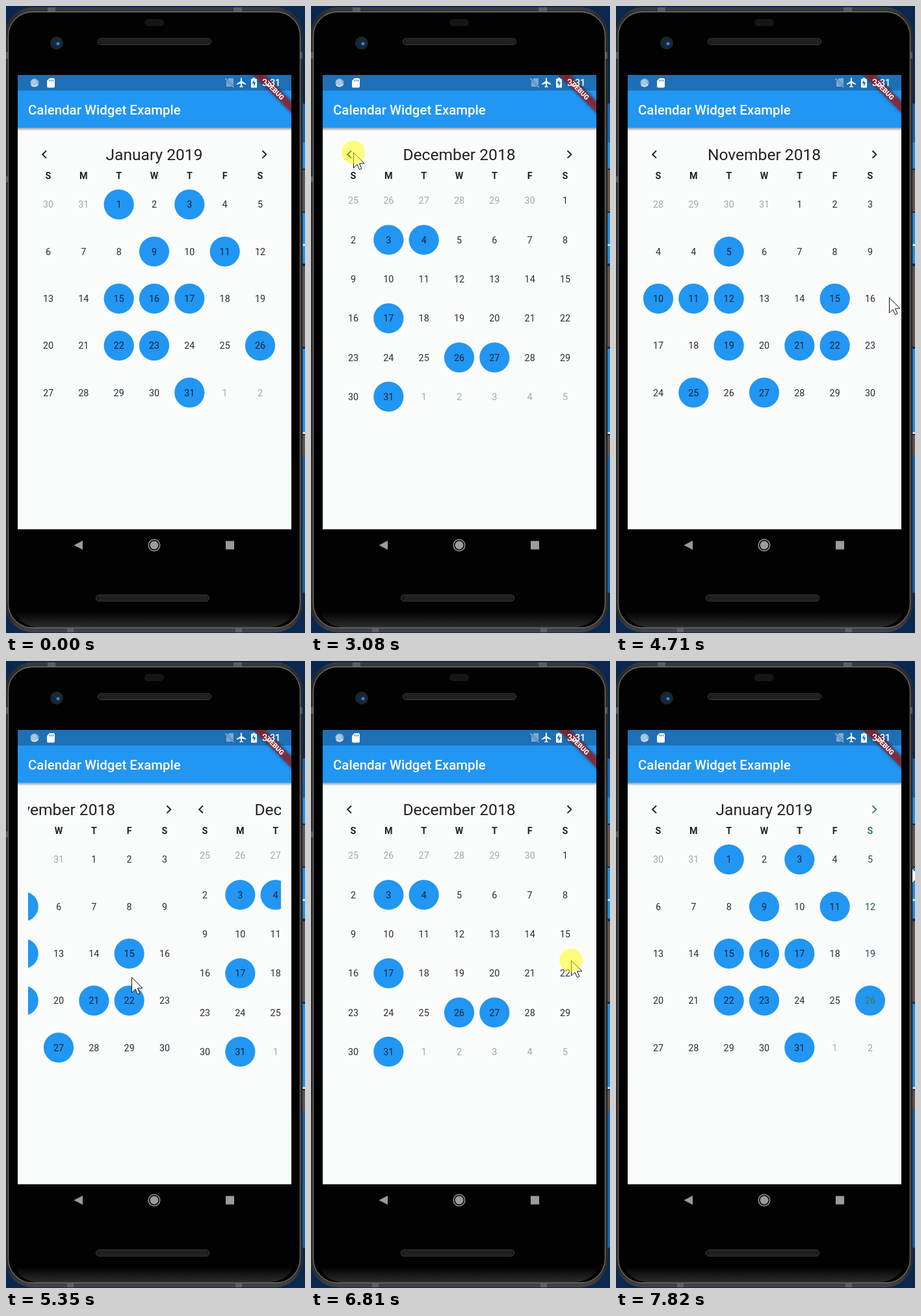
Write an HTML page that moves like this. It is 460 px wide and 964 px high and loops after 8 s.

```html
<!DOCTYPE html>
<html lang="en">
<head>
<meta charset="utf-8">
<title>Calendar swipe</title>
<style>
  html, body { margin: 0; width: 100%; height: 100%; overflow: hidden; background: #0a2750; }
  svg { display: block; width: 100vw; height: 100vh; }
  text { font-family: Roboto, sans-serif; }
  .page text { text-anchor: middle; font-size: 14.34px; fill: #2c2c2c; }
  .page .title { font-size: 24.58px; fill: #222; }
  .page .weekday { font-weight: 700; fill: #222; }
  .page .outside { fill: #a5a7a6; }
  .page .marked { fill: #0a2236; }
  .page circle { fill: #2196f3; }
  .page path { fill: none; stroke: #222; stroke-width: 2; }
  .tinted .col6 { fill: #1f4f5c; }
  .tinted .col6.weekday { fill: #2f8248; }
  .tinted .col6.outside { fill: #8fa9b8; }
  .tinted .col6.marked { fill: #4d7a3a; }
  .tinted .next { stroke: #2f8a4c; }
</style>
</head>
<body>
<svg viewBox="0 0 460 964" preserveAspectRatio="none">
  <defs>
    <linearGradient id="rim" x2="0" y2="1">
      <stop offset="0" stop-color="#3c3e3e"/><stop offset=".012" stop-color="#2b2c2c"/>
      <stop offset=".975" stop-color="#2b2c2c"/><stop offset="1" stop-color="#444"/>
    </linearGradient>
    <linearGradient id="chin" x2="0" y2="1">
      <stop offset="0" stop-color="#2c2c2c" stop-opacity="0"/><stop offset="1" stop-color="#2c2c2c"/>
    </linearGradient>
    <linearGradient id="shade" x2="0" y2="1">
      <stop offset="0" stop-opacity=".4"/><stop offset="1" stop-opacity="0"/>
    </linearGradient>
    <filter id="soft" x="-20%" y="-20%" width="140%" height="140%"><feGaussianBlur stdDeviation="2.500"/></filter>
    <clipPath id="screen"><path d="M18 106h421v698.500H18z"/></clipPath>
    <clipPath id="viewport"><path d="M34 200h389v440H34z"/></clipPath>
  </defs>

  <!-- desktop behind the phone, with the side buttons -->
  <path fill="#0a2750" d="M0 0h460v964H0z"/>
  <path fill="#1565b5" d="M452 150h8v60h-8zM452 690h8v212h-8z"/>
  <path fill="#1c93ea" d="M452 210h8v40h-8zM452 318h8v78h-8zM452 527h8v130h-8z"/>
  <path fill="#665850" d="M452 252h8v64h-8zM452 400h8v124h-8zM452 660h8v30h-8z"/>
  <path fill="#d7e6f3" d="M452 366h8v3h-8zM452 655h8v3h-8z"/>

  <!-- phone body -->
  <rect x="-1" y="2" width="457.500" height="961" rx="42" fill="url(#rim)"/>
  <rect x="3.500" y="9" width="449" height="947" rx="37" fill="#020202" stroke="#707272" stroke-width="1.300"/>
  <path fill="url(#chin)" d="M14 932h428q-9 20-34 23H46q-24-3-32-23z"/>
  <path fill="#777" d="M0 71h4v10H0zM0 262h4v9H0zM453 71h3v10h-3zM64 2h12v7H64zM350 2h13v7h-13zM94 957h10v6H94zM353 957h10v6h-10z" opacity=".6"/>
  <rect x="213" y="20" width="30" height="11" rx="5.5" fill="#151617"/>
  <circle cx="78" cy="57" r="10" fill="#232425"/>
  <circle cx="78" cy="57" r="6" fill="#0d2b4d"/>
  <circle cx="80" cy="58" r="2.5" fill="#3b82c4"/>
  <g id="speaker">
    <rect x="141.5" y="50" width="174" height="9.5" rx="4.5" fill="#191919" stroke="#414141"/>
    <path d="M146 53h166M147 56.5h165" stroke="#3a3a3a" stroke-width="1.5" stroke-dasharray="1 1"/>
  </g>
  <use href="#speaker" x="-3" y="855.5"/>

  <!-- app -->
  <g clip-path="url(#screen)">
    <path fill="#fafcfb" d="M18 106h421v699H18z"/>
    <path fill="#2196f3" d="M18 130h421v57H18z"/>
    <path fill="#1d70b7" d="M18 106h421v24H18z"/>
    <path fill="url(#shade)" d="M18 187h421v5H18z"/>
    <text x="34" y="167" font-size="20.48" font-weight="500" fill="#fff">Calendar Widget Example</text>
    <circle cx="44" cy="118" r="6.5" fill="#86b2d8"/>
    <path d="M39 121a6 6 0 0 0 10-1" fill="none" stroke="#d6e5f2" stroke-width="2"/>
    <circle cx="43" cy="117" r="4.6" fill="#a7c7e2"/>
    <path fill="#fff" d="M67 111h6q2 0 2 2v10.500q0 2-2 2h-8q-2 0-2-2V115z"/>
    <path d="M67.500 113v3M70 113v3M72.500 113v3" stroke="#1d70b7"/>
    <path fill="#7fa9d0" d="M343 111h7v13h-11v-9z"/>
    <path d="M337.500 111.500l13 13.500" stroke="#1d70b7" stroke-width="3"/>
    <path d="M337.500 111.500l13 13.500" stroke="#9abbd9" stroke-width="1.300"/>
    <path fill="#fff" d="M361 111q1-1.500 2 0v4.500l6 4v1.600l-6-2v3.700l1.600 1.300v1.200l-2.600-.8-2.600.8v-1.200l1.600-1.300v-3.700l-6 2v-1.600l6-4z"/>
    <path fill="#fff" d="M379.500 110.500h4v1.500h2.500v13.500h-9V112h2.500z"/>
    <path fill="#1d70b7" d="M382 113.500v4h2.500l-3.500 6v-4.500h-2.500z"/>
    <path id="ribbon" fill-opacity=".5" filter="url(#soft)" d="M371 96h17.500l61 61v17.500z"/>
    <path fill="#b71c1c" fill-opacity=".63" d="M371 96h17.500l61 61v17.500z"/>
    <text transform="translate(414.400 130.600) rotate(45)" y="3.700" text-anchor="middle" font-size="10.450" font-weight="900" fill="#fff">DEBUG</text>
    <text x="394" y="123" font-size="14.340" font-weight="500" fill="#fff">3:31</text>
    <g id="pages" clip-path="url(#viewport)"></g>
  </g>

  <g fill="#9b9b9b">
    <path d="M118 822v14l-13.500-7zM338 822.500h13v13h-13z"/>
    <circle cx="228" cy="829" r="6.500"/>
    <circle cx="228" cy="829" r="8.800" fill="none" stroke="#9b9b9b" stroke-width="1.500"/>
  </g>

  <path id="cursor" d="M.5.5V24l5.500-5.500 3.500 8 3.500-1.500-3.500-8H17z" fill="#fff" stroke="#111"/>
  <circle id="press" r="18" fill="#ff0" fill-opacity=".5"/>
</svg>

<script>
const LOOP = 8000, STEP = 77.2, LEAD = 20, PAGE_WIDTH = 388;
const pagesLayer = document.getElementById('pages');
const press = document.getElementById('press');
const cursor = document.getElementById('cursor');

const range = (from, to) => Array.from({ length: to - from + 1 }, (_, i) => from + i);

// November repeats the 4th, as the calendar does at the clock change.
const months = [
  { title: 'November 2018', before: range(28, 31), days: [...range(1, 4), ...range(4, 30)], after: [],
    marked: [5, 10, 11, 12, 15, 19, 21, 22, 25, 27] },
  { title: 'December 2018', before: range(25, 30), days: range(1, 31), after: range(1, 5),
    marked: [3, 4, 17, 26, 27, 31] },
  { title: 'January 2019', before: range(30, 31), days: range(1, 31), after: range(1, 2),
    marked: [1, 3, 9, 11, 15, 16, 17, 22, 23, 26, 31] },
];

const columnX = column => 65 + 54.33 * column;
const label = (x, y, cls, value) => `<text x="${x}" y="${y}" class="${cls}">${value}</text>`;

function pageMarkup({ title, before, days, after, marked }) {
  const cells = [...before, ...days, ...after];
  const [top, rowHeight] = cells.length > 35 ? [299.2, 60.3] : [305.2, 72.3];
  let out = label(228, 236.5, 'title', title) +
    '<path d="M62 222.500l-5.800 5.700 5.800 5.700"/><path class="next" d="M394.500 222.500l5.800 5.700-5.800 5.700"/>';
  [...'SMTWTFS'].forEach((letter, c) => out += label(columnX(c), 266, `weekday col${c}`, letter));
  cells.forEach((day, i) => {
    const column = i % 7, x = columnX(column), y = top + rowHeight * Math.floor(i / 7);
    const inside = i >= before.length && i < before.length + days.length;
    const isMarked = inside && marked.includes(day);
    if (isMarked) out += `<circle cx="${x}" cy="${y}" r="23.1"/>`;
    out += label(x, y + 5.2, `col${column} ${isMarked ? 'marked' : inside ? '' : 'outside'}`, day);
  });
  return `<g class="page">${out}</g>`;
}

pagesLayer.innerHTML = months.map(pageMarkup).join('');
const pages = [...pagesLayer.children];

// Keys are [step, ...values]; one step is one screen refresh.
const cursorKeys = [
  [6, 239, 508], [8, 225, 349], [12, 225, 349], [20, 65, 225], [41, 65, 225], [42, 63, 234],
  [43, 63, 234], [54, 433, 443], [55, 436, 443], [56, 436, 443], [61, 420, 448], [65, 420, 448],
  [72, 45, 510], [75, 45, 510], [86, 400, 460], [90, 400, 460], [96, 0, 490], [96.6, 0, 490], [101, 455, 318],
];
const pageKeys = [
  [27, 2], [32, 1], [43, 1], [48, 0], [66, 0], [73, 0.965], [74, 0.979], [77, 1], [90, 1], [98, 2],
];
const pressSpans = [[24, 26], [40, 42], [63, 65], [88, 90]];

function valuesAt(keys, step) {
  const next = keys.findIndex(key => key[0] > step);
  if (next < 0) return keys.at(-1).slice(1);
  if (next === 0) return keys[0].slice(1);
  const a = keys[next - 1], b = keys[next];
  const u = (step - a[0]) / (b[0] - a[0]), eased = u * u * (3 - 2 * u);
  return a.slice(1).map((v, i) => v + (b[i + 1] - v) * eased);
}

function draw(now) {
  const step = Math.floor((now % LOOP + LEAD) / STEP);
  const [position] = valuesAt(pageKeys, step);
  pages.forEach((page, i) =>
    page.setAttribute('transform', `translate(${Math.round((i - position) * PAGE_WIDTH)} 0)`));
  pagesLayer.classList.toggle('tinted', step >= 99);

  const place = `translate(${valuesAt(cursorKeys, step).map(Math.round).join(' ')})`;
  cursor.setAttribute('transform', place);
  press.setAttribute('transform', place);
  cursor.style.display = step >= 6 ? '' : 'none';
  press.style.display = pressSpans.some(([on, off]) => step >= on && step < off) ? '' : 'none';
}

function tick() {
  draw(performance.now());
  requestAnimationFrame(tick);
}
tick();
</script>
</body>
</html>
```
